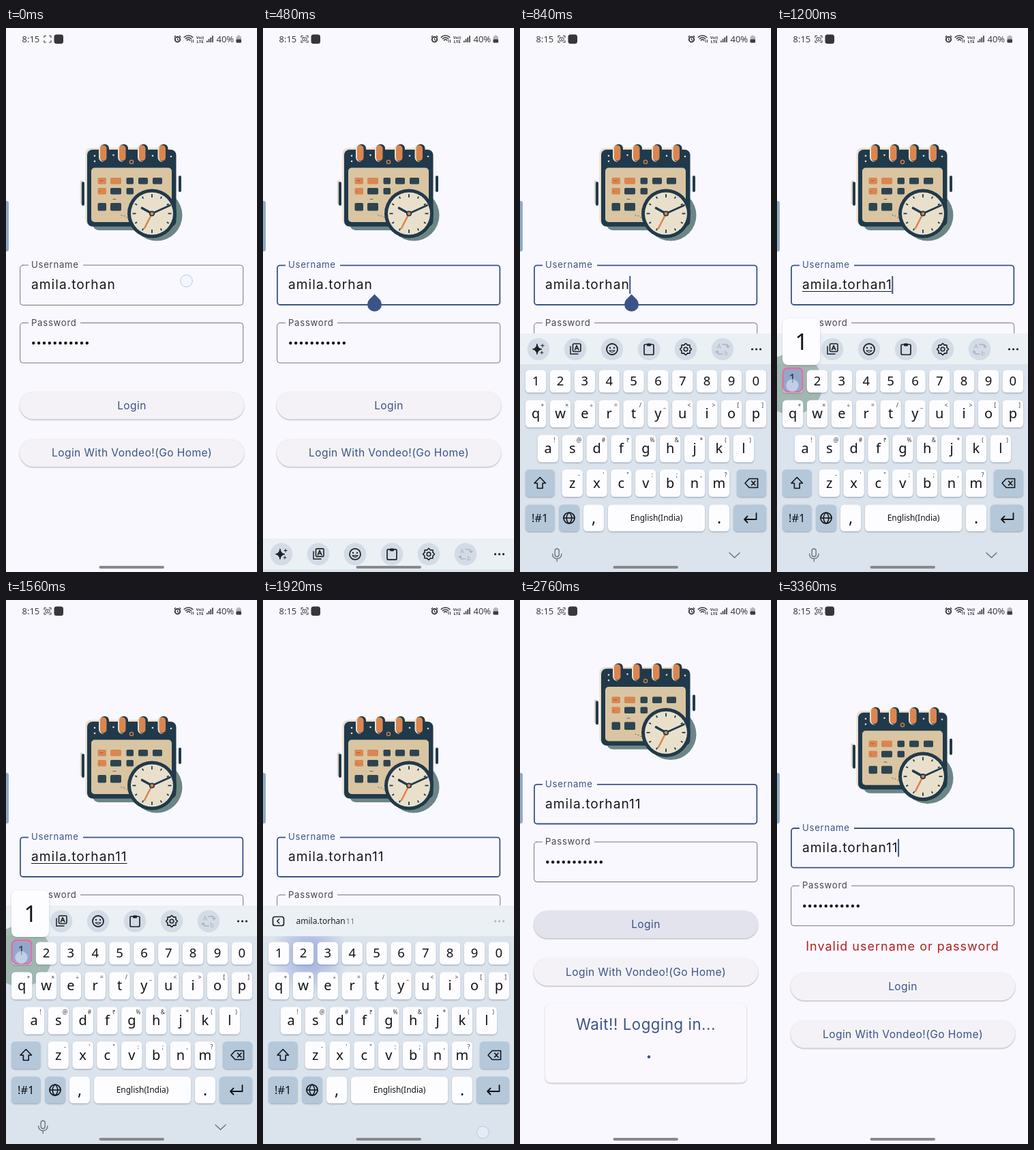
An HTML page with a canvas for the animation above (3.48 s loop, 368x796 px).

```html
<!DOCTYPE html>
<html lang="en">
<head>
<meta charset="utf-8">
<title>Login screen</title>
<style>
html, body { margin: 0; width: 368px; height: 796px; overflow: hidden; background: #f9f8fe; }
canvas { display: block; width: 368px; height: 796px; }
</style>
</head>
<body>
<canvas id="stage"></canvas>
<script>
const W = 368, H = 796, LOOP = 3480, STEP = 120;
const BLUE = '#3b5488', NAVY = '#203a4b', CREAM = '#e9e0cc', ORANGE = '#da8650';
const UI = 'Inter, sans-serif', KEYS = '"Noto Sans", sans-serif';
const USER = 'amila.torhan';

const canvas = document.getElementById('stage');
const scale = window.devicePixelRatio || 1;
canvas.width = W * scale;
canvas.height = H * scale;
const c = canvas.getContext('2d');

function box(x, y, w, h, r, fill, stroke, lw = 1) {
  c.beginPath();
  c.roundRect(x, y, w, h, r);
  if (fill) { c.fillStyle = fill; c.fill(); }
  if (stroke) { c.strokeStyle = stroke; c.lineWidth = lw; c.stroke(); }
}

function disc(x, y, r, fill, stroke, lw = 1) {
  c.beginPath();
  c.arc(x, y, r, 0, Math.PI * 2);
  if (fill) { c.fillStyle = fill; c.fill(); }
  if (stroke) { c.strokeStyle = stroke; c.lineWidth = lw; c.stroke(); }
}

function path(d, color, lw = 1.5, fill) {
  const p = new Path2D(d);
  if (fill) { c.fillStyle = fill; c.fill(p); }
  if (color) {
    c.strokeStyle = color;
    c.lineWidth = lw;
    c.lineCap = c.lineJoin = 'round';
    c.stroke(p);
  }
}

// Draws text and returns its width
function text(s, x, y, size, color, { font = UI, align = 'left', gap = 0, weight = 400 } = {}) {
  c.font = `${weight} ${size}px ${font}`;
  c.letterSpacing = gap + 'px';
  c.textAlign = align;
  c.fillStyle = color;
  c.fillText(s, x, y);
  const w = c.measureText(s).width;
  c.letterSpacing = '0px';
  return w;
}

function at(x, y, draw) {
  c.save();
  c.translate(x, y);
  draw();
  c.restore();
}

function withShadow(color, blur, dy, draw) {
  c.save();
  c.shadowColor = color;
  c.shadowBlur = blur * scale;
  c.shadowOffsetY = dy * scale;
  draw();
  c.restore();
}

function statusBar(t) {
  const ink = '#3c3c40';
  text('8:15', 23.5, 21, 13, ink, { font: KEYS });
  path('M56 14V11.5H58.5 M63.5 11.5H66V14 M66 18.5V21H63.5 M58.5 21H56V18.5', ink, 1.1);
  if (t % 360 >= 120) {
    box(58, 14, 6, 4.8, 1, null, ink, 1);
    disc(61, 16.4, 0.9, ink);
  }
  box(70.5, 9.5, 13.5, 13.5, 3.5, '#37373b');
  disc(251.5, 16.8, 3.7, null, ink, 2);
  path('M251.5 15V17L253 18 M247 13L248.6 11.5 M256 13L254.4 11.5', ink, 1.2);
  for (const r of [9, 6, 3]) {
    c.beginPath();
    c.arc(267.5, 20, r, -2.35, -0.79);
    c.strokeStyle = ink;
    c.lineWidth = 1.5;
    c.stroke();
  }
  path('M272 17.5V21 M274.5 21V17.5', ink, 1);
  text('Vo))', 284.5, 15.5, 6, ink, { font: KEYS, align: 'center', weight: 700 });
  text('LTE', 284.5, 21.5, 6, ink, { font: KEYS, align: 'center', weight: 700 });
  for (let i = 0; i < 4; i++) box(294 + i * 2.7, 18.5 - i * 2.4, 1.7, 2.5 + i * 2.4, 0.5, ink);
  text('40%', 308.5, 21, 13, ink, { font: KEYS });
  box(337.5, 12, 7.5, 9.5, 1.5, '#b5b5ba');
  box(339.5, 10.7, 3.5, 2, 0.5, '#b5b5ba');
  box(337.5, 16.5, 7.5, 5, 1.2, ink);
}

function calendar() {
  box(127, 190, 110, 106, 9, '#6c8686');
  disc(221, 274, 37.5, '#6c8686');
  box(116.5, 175.5, 126, 113, 8, '#e8dfce');
  box(108.8, 223, 4, 35, 2, '#d8d2c6');
  box(111, 225, 4, 35, 2, NAVY);
  box(253, 216, 4, 24, 2, NAVY);
  box(119, 178, 130.5, 112.5, 8, NAVY);
  box(125, 204.5, 118, 79.5, 5, '#d9c5a2');
  for (const x of [143, 171, 200, 229.5]) {
    box(x - 7, 170, 13, 26, 6.5, CREAM);
    box(x - 4.5, 170, 12.5, 26, 6.2, NAVY);
    box(x - 5, 171.5, 9.5, 23, 4.7, ORANGE);
  }
  for (const [x, y] of [[130, 187], [130, 195], [157.5, 186], [215, 187], [242, 188]]) disc(x, y, 1.3, CREAM);
  disc(184, 196, 2.6, null, ORANGE, 1.3);
  const cols = [[134.5, 12.5], [153, 16], [176.5, 10.5], [194, 14], [215, 14]];
  [[219, 5, 2], [234, 3, 1], [256, 2, 0]].forEach(([y, n, hot]) => {
    for (let i = 0; i < n; i++) box(cols[i][0], y, cols[i][1], y > 250 ? 11.5 : 9.5, 1.8, i < hot ? ORANGE : '#2d4450');
  });
  path('M157 250.5H161 M169 274H170 M173 275H174 M177 277H177.5', '#705f4d', 1);
  path('M138 223.5H142 M137 239.5H138', '#9c5735', 0.9);

  at(214, 271.5, () => {
    disc(0, 0, 36, NAVY);
    disc(0, 0, 31, CREAM);
    for (let i = 0; i < 12; i++) {
      box(-0.9, -28.5, 1.8, i % 3 ? 3.2 : 5, 0, NAVY);
      c.rotate(Math.PI / 6);
    }
    path('M0 0L-11 21.5', ORANGE, 2.6);
    path('M0 0L-14.5 -8', NAVY, 3.6);
    path('M0 0L26.5 -12', NAVY, 2.8);
    disc(0, 0, 3.2, ORANGE, NAVY, 1.8);
  });
}

function field(y, label, gapEnd, active) {
  if (active) box(21, y + 0.3, 326.3, 57.7, 4, null, BLUE, 1.8);
  else box(20.7, y, 327, 58.5, 4, null, '#75757d', 1);
  c.fillStyle = '#f9f8fe';
  c.fillRect(33, y - 2, gapEnd - 33, 4);
  text(label, 37, y + 4.2, 13.2, active ? BLUE : '#46464e', { gap: 0.7 });
}

function button(y, label, fill = '#f4f2f6') {
  withShadow('rgba(0,0,0,.3)', 2, 1, () => box(20, y, 329, 40.5, 20.2, fill));
  text(label, 184.5, y + 25.7, 15.6, BLUE, { align: 'center', gap: 0.4 });
}

function loadingCard(t) {
  withShadow('rgba(0,0,0,.28)', 2, 1, () => box(37, 590, 295, 116.5, 8, '#faf8fd'));
  text('Wait!! Logging in...', 184.5, 629, 22.2, BLUE, { align: 'center', gap: 0.55 });
  const k = (t - 2760) / 120;
  const start = -1.3 + k * 0.7, sweep = 0.05 + k * 1.5;
  c.beginPath();
  c.arc(184.5, 684, 16, start, start + sweep);
  c.strokeStyle = BLUE;
  c.lineWidth = 3.6;
  c.lineCap = 'butt';
  c.stroke();
  if (k < 0.5) disc(189, 668.5, 2.2, BLUE);
}

function form(t) {
  const focused = t >= 240;
  const loading = t >= 2760 && t < 3000;
  const failed = t >= 3000;
  const lift = loading ? -77.5 : failed ? -13.3 : 0;
  at(0, lift, () => {
    calendar();
    field(347, 'Username', 113, focused);
    const typed = t < 1200 ? '' : t < 1560 ? '1' : '11';
    const w = text(USER + typed, 37, 382, 19.2, '#17171b', { gap: 1 });
    if (typed && t < 1680) box(37, 385, w, 1, 0, '#17171b');
    if (t >= 840 && (t + 160) % 440 < 250) box(36.5 + w, 363, 2, 26, 0, BLUE);
    if (t >= 360 && t < 1200) path('M163.5 389.5L171 397A10.5 10.5 0 1 1 156 397Z', null, 0, BLUE);
    field(431.5, 'Password', 109, false);
    for (let i = 0; i < 11; i++) disc(40.3 + i * 7.85, 461, 2.25, '#17171b');
  });
  const drop = failed ? 13.5 : lift;
  if (failed) text('Invalid username or password', 184, 513, 18, '#b3201d', { align: 'center', gap: 1 });
  const pressed = t >= 2640 && t < 3000;
  button(532 + drop, 'Login', pressed ? '#e2e3ec' : undefined);
  button(601.5 + drop, 'Login With Vondeo!(Go Home)');
  if (loading) loadingCard(t);
}

function toolbar(t) {
  const ink = '#1f2125';
  if (t >= 1680) {
    box(14.5, 463.5, 16, 13, 3, null, ink, 1.7);
    path('M23.8 467L20.8 470L23.8 473', ink, 1.6);
    const w = text(USER, 48.5, 474, 12, ink, { font: KEYS });
    text('11', 49.5 + w, 474, 10.5, '#6c7077', { font: KEYS, gap: 0.6 });
  } else {
    for (let i = 0; i < 6; i++) disc(27 + i * 54, 470, 16.3, '#d3dce6');
    path('M25 462.5Q26 469 32 470Q26 471 25 477.5Q24 471 18.5 470Q24 469 25 462.5Z M33 462.5V467 M30.8 464.7H35.3 M32 473V477 M30 475H34', ink, 1, ink);
    box(77.5, 462, 11.5, 11.5, 2, null, ink, 1.6);
    path('M74 466V477H85 M80.5 471L83 464.5L86 471 M81.5 469H85', ink, 1.5);
    disc(135, 470, 8, null, ink, 1.8);
    disc(132, 468, 1.2, ink);
    disc(138, 468, 1.2, ink);
    path('M131 472Q135 477 139 472Z', ink, 1.2);
    box(182, 463, 14, 15, 2, null, ink, 1.7);
    box(186, 461.5, 6, 4, 1, ink);
    let gear = '';
    for (let i = 0; i <= 32; i++) {
      const a = i * Math.PI / 16, r = 7.4 + Math.cos(a * 8);
      gear += `${i ? 'L' : 'M'}${243 + r * Math.cos(a)} ${470 + r * Math.sin(a)}`;
    }
    path(gear, ink, 1.6);
    disc(243, 470, 2.8, null, ink, 1.6);
    // Greyed-out translate icon
    path('M297 463H302Q305 463 305 467 M303 465.5L305 467.5L307 465.5 M297 477H292Q289 477 289 473 M287 474.5L289 472.5L291 474.5', '#a9b2bd', 1.4);
    text('A', 292, 469, 9, '#a9b2bd', { font: KEYS, align: 'center' });
    text('b', 302, 479, 9, '#a9b2bd', { font: KEYS, align: 'center' });
  }
  for (const x of [340.5, 346.5, 352.5]) disc(x, 470, 1.6, t >= 1680 ? '#aeb4bb' : ink);
}

function key(x, y, w, h, label, { hint, fill = '#fdfdff', size = 20 } = {}) {
  withShadow('rgba(70,85,110,.42)', 2, 1.2, () => box(x, y, w, h, 5.5, fill));
  if (label) text(label, x + w / 2, y + h / 2 + size * 0.34, size, '#101216', { font: KEYS, align: 'center', weight: 500 });
  if (hint) text(hint, x + w - 5.5, y + 10.5, 8.5, '#33363c', { font: KEYS, align: 'center', weight: 500 });
}

function keyRow(x, y, h, labels, hints = '', size = 20) {
  [...labels].forEach((s, i) => key(x + i * 35.85, y, 30.4, h, s, { hint: hints[i], size }));
}

function glow(x, y, r, color) {
  const g = c.createRadialGradient(x, y, r * 0.3, x, y, r);
  g.addColorStop(0, color);
  g.addColorStop(1, color.replace(/[\d.]+\)$/, '0)'));
  c.fillStyle = g;
  c.fillRect(Math.max(0, x - r), Math.max(492, y - r), r * 2, r * 2);
}

function keyboardOffset(t) {
  if (t < 480 || t >= 2280) return null;
  if (t < 840) return 17 * Math.pow(4.2, (720 - t) / 120);
  if (t < 2040) return 0;
  return t < 2160 ? 90 : 270;
}

function keyboard(t) {
  const off = keyboardOffset(t);
  if (off === null) return;
  const press = (t >= 1200 && t < 1320) || (t >= 1560 && t < 1680);
  at(0, off, () => {
    box(0, 447, W, 45, 0, '#ebf0f5');
    box(0, 492, W, 349, 0, '#dbe3ec');
    toolbar(t);
    if (press) disc(22, 521, 45, 'rgba(126,157,143,.62)');
    else if (t >= 1320 && t < 1560) glow(40, 518, 75, 'rgba(120,150,190,.45)');
    else if (t >= 1680 && t < 2040) glow(68, 520, 58, `rgba(125,145,218,${t < 1920 ? 0.65 : 0.5})`);
    keyRow(8, 500.5, 33, '1234567890', '', 18.5);
    keyRow(8, 544.5, 40, 'qwertyuiop', '+×÷=/_<>[]');
    keyRow(25.8, 595.5, 40, 'asdfghjkl', '!@#₹%&*()');
    keyRow(61.5, 646, 40, 'zxcvbnm', '-\'":;,?');
    const dark = { fill: '#b5c8da', size: 16.5 };
    key(8, 646, 42.5, 40, '', dark);
    key(318, 646, 43, 40, '', dark);
    key(8, 697.5, 42.5, 39, '!#1', dark);
    key(57.5, 697.5, 29.5, 39, '', dark);
    key(93, 697.5, 30, 39, ',', { size: 23 });
    key(129, 697.5, 142, 39, 'English(India)', { size: 12 });
    key(277, 697.5, 30, 39, '.', { size: 23 });
    key(313, 697.5, 48, 39, '', dark);
    const ink = '#101216';
    path('M29.3 657.5L37.5 666H33.2V673.5H25.4V666H21Z', ink, 1.6);
    path('M330 666L336 659.5H348.5V672.5H336Z M339.5 663L345 669 M345 663L339.5 669', ink, 1.6);
    disc(72, 717, 8, null, ink, 1.7);
    path('M64 717H80 M72 709C67 713 67 721 72 725 M72 709C77 713 77 721 72 725', ink, 1.5);
    path('M346.5 710V719H329 M333.5 714.5L329 719L333.5 723.5', ink, 1.8);
    if (press) {
      box(9, 497.8, 28.4, 34.4, 6, '#93a8c8', '#ea69a6', 2.2);
      text('1', 22.5, 519, 18, '#26344e', { font: KEYS, align: 'center', weight: 500 });
      withShadow('rgba(60,70,90,.25)', 3, 1, () => box(8, 425, 55, 68, 8, '#fdfdff'));
      text('1', 36, 471, 33, '#111317', { font: KEYS, align: 'center', weight: 500 });
    }
  });
  if (t >= 600 && t < 1920) {
    const grey = '#6d747d';
    box(51.2, 762, 6, 11.5, 3, null, grey, 1.4);
    path('M47.5 769.5Q48 776.5 54.2 776.5Q60.5 776.5 61 769.5 M54.2 777V780.5', grey, 1.4);
    path('M307 768L314.5 775L322 768', grey, 1.5);
  }
}

// Touch marks: from, to, x, y
const touches = [[0, 120, 264.5, 370], [1200, 1320, 22.5, 523], [1560, 1680, 22.5, 523],
  [1920, 2040, 322.5, 779], [2520, 2760, 281, 553]];

function draw(t) {
  c.setTransform(scale, 0, 0, scale, 0, 0);
  c.fillStyle = '#f9f8fe';
  c.fillRect(0, 0, W, H);
  form(t);
  statusBar(t);
  keyboard(t);
  box(-4, 253, 8, 74, 3, '#8fabc7');
  box(136.5, 787, 95.5, 4, 2, '#88898d');
  for (const [from, to, x, y] of touches) {
    if (t >= from && t < to) disc(x, y, 8.8, 'rgba(240,245,255,.5)', '#b3c9ee', 1);
  }
}

function tick() {
  const t = performance.now() % LOOP;
  draw(Math.floor(t / STEP) * STEP);
  requestAnimationFrame(tick);
}
tick();
</script>
</body>
</html>
```
